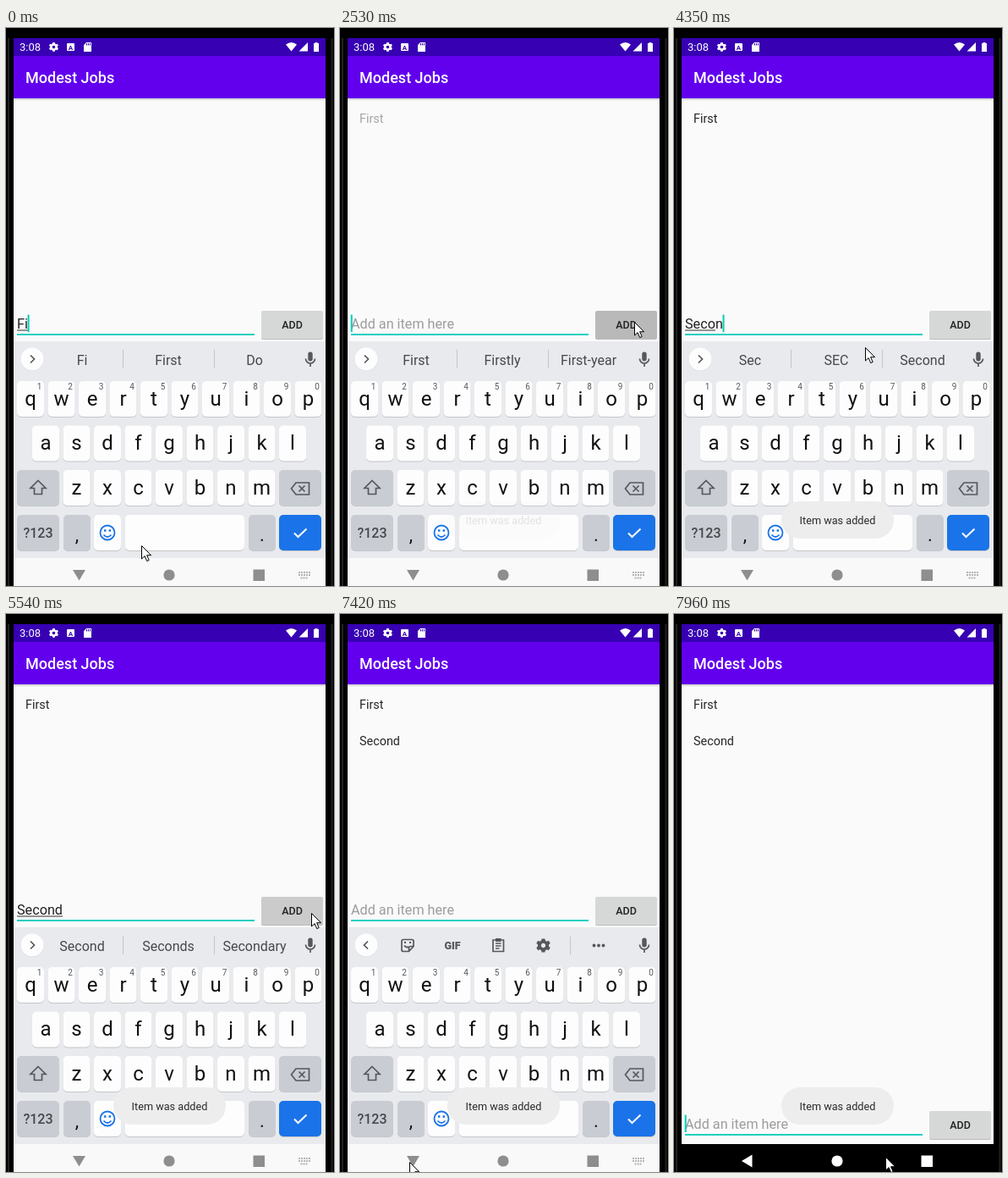
Write an HTML page that moves like this. It is 388 px wide and 659 px high and loops after 8000 ms.

```html
<!DOCTYPE html>
<html lang="en">
<head>
<meta charset="utf-8">
<title>Modest Jobs</title>
<style>
html, body { margin: 0; width: 100%; height: 100%; overflow: hidden; background: #000; }
svg { display: block; width: 388px; height: 659px; font-family: Roboto, sans-serif; }
text { white-space: pre; }
.mid { text-anchor: middle; }
.line { fill: none; stroke: #54585d; stroke-width: 1.7; }
</style>
</head>
<body>
<svg viewBox="0 0 388 659">
  <defs>
    <path id="gear" d="M-1.4-6h2.8l.4 1.7 1.3.7 1.6-.6 1.4 2.4-1.3 1.1v1.4l1.3 1.1-1.4 2.4-1.6-.6-1.3.7-.4 1.7h-2.8l-.4-1.7-1.3-.7-1.6.6-1.4-2.4 1.3-1.1v-1.4l-1.3-1.1 1.4-2.4 1.6.6 1.3-.7zM0-2a2 2 0 1 0 .01 0z" fill-rule="evenodd"/>
    <linearGradient id="shade" x2="0" y2="1"><stop stop-color="#000" stop-opacity=".22"/><stop offset="1" stop-color="#000" stop-opacity="0"/></linearGradient>
    <clipPath id="screen"><path d="M9 12h369v647H9z"/></clipPath>
  </defs>
  <path d="M0 0h388v659H0z"/>
  <path d="M3 12v647M385.5 12v647" stroke="#222" stroke-width="2"/>
  <g clip-path="url(#screen)">
    <path d="M9 83h369v576H9z" fill="#fafafa"/>
    <path d="M9 83h369v3H9z" fill="url(#shade)"/>
    <path d="M9 12h369v21H9z" fill="#3700b3"/>
    <path d="M9 33h369v50H9z" fill="#6200ee"/>
    <g fill="#fff">
      <text x="16" y="27" font-size="13">3:08</text>
      <text x="23" y="65" font-size="18" font-weight="500">Modest Jobs</text>
      <use href="#gear" x="56.5" y="22.5" transform="translate(5.6 2.2) scale(.9)"/>
      <rect x="72" y="18" width="9" height="9" rx="1"/>
      <text class="mid" x="76.5" y="25.5" font-size="8" font-weight="700" fill="#3700b3">A</text>
      <path d="M95 17h6v11h-9v-8zM331 19.5q6.500-5 13 0l-6.500 8zM346.500 27.500h10.500v-10.500zM365.500 17h3v1h1.500v10h-6v-10h1.500z"/>
      <path d="M95.500 18v2.500m2-2.500v2.500m2-2.500v2.500" stroke="#3700b3"/>
    </g>
    <g font-size="14.4" fill="#262626">
      <text id="item1" x="23" y="111.500">First</text>
      <text id="item2" x="23" y="154.500">Second</text>
    </g>
    <g id="row">
      <text id="hint" x="13" y="355" font-size="16.2" fill="#9c9c9c">Add an item here</text>
      <text id="entry" x="13" y="355" font-size="16.2" fill="#222"></text>
      <text id="mark" x="13" y="355" font-size="16.2" visibility="hidden"></text>
      <rect id="under" x="13" y="356.500" height="1" fill="#333"/>
      <path d="M13 361h281v2H13z" fill="#22cfc1"/>
      <rect id="caret" y="338.500" width="2" height="20.500" fill="#03cdb9"/>
      <rect x="302" y="335" width="73" height="33" rx="2" fill="#bbb"/>
      <rect id="button" x="302" y="334" width="73" height="33" rx="2"/>
      <text class="mid" x="338.500" y="355" font-size="12.500" font-weight="500" fill="#222">ADD</text>
    </g>
    <g id="board">
      <path d="M9 370h369v260H9z" fill="#e8eaed"/>
      <circle cx="31" cy="391.500" r="13.500" fill="#d5d7da"/>
      <circle cx="31" cy="391" r="13.500" fill="#fdfdfd"/>
      <path id="chevron" class="line" d="M-2-4.500L2.500 0-2 4.500"/>
      <g id="words" font-size="16" fill="#45484c">
        <path d="M138.500 380v22M246.500 380v22" stroke="#c3c6ca"/>
        <text class="mid" x="90" y="397.500"></text>
        <text class="mid" x="192" y="397.500"></text>
        <text class="mid" x="294" y="397.500"></text>
      </g>
      <g id="tools" fill="#54585d">
        <path class="line" d="M75 384.500h10q2 0 2 2v6l-5.500 6h-6.500q-2 0-2-2v-10q0-2 2-2zM87 392.500h-3.500q-2 0-2 2v4M76 391.500q2 3 5 1.500"/>
        <path d="M76 387h2v2h-2zm6 0h2v2h-2z"/>
        <text class="mid" x="133" y="395.500" font-size="12.500" font-weight="900">GIF</text>
        <path class="line" d="M181 385h12.500v13.500h-12.500zM184 389h6.500M184 392h6.500M184 395h4.500"/>
        <path d="M184 383h6.500v4h-6.500z"/>
        <use href="#gear" transform="translate(240.500 391.500) scale(1.350)"/>
        <path d="M272.500 381v21" stroke="#c3c6ca"/>
        <circle cx="300.500" cy="391.500" r="1.900"/><circle cx="306" cy="391.500" r="1.900"/><circle cx="311.500" cy="391.500" r="1.900"/>
      </g>
      <rect x="357.300" y="382.500" width="5.400" height="11" rx="2.700" fill="#54585d"/>
      <path class="line" d="M354.500 390.500a5.500 5.500 0 0 0 11 0M360 396v4"/>
      <g id="keys"></g>
      <path class="line" d="M38 534.500l9 9h-4.500v7h-9v-7H29z"/>
      <path class="line" d="M343 537h15.500v14H343l-5.500-7zM346.500 540.500l7 7m0-7l-7 7"/>
      <g fill="none" stroke="#1a73e8" stroke-width="1.800">
        <circle cx="120" cy="596" r="8.500"/>
        <path d="M115.500 598.500q4.500 5 9 0"/>
        <path d="M116 593.500h2.400m3.200 0h2.400" stroke-width="2.400"/>
      </g>
      <path d="M341 596.500l4.500 4.500 10-9.500" fill="none" stroke="#fff" stroke-width="2"/>
    </g>
    <path id="navBack" d="M9 626h369v33H9z"/>
    <g id="nav">
      <path id="back" d="M-7.500-6h15l-7.500 12.500z"/>
      <circle cx="193" cy="646" r="6.600"/>
      <path d="M292.500 639.500h13.500v13.500h-13.500z"/>
    </g>
    <path id="switcher" d="M346 643h14M346 646h14M348.500 649.500h9" stroke="#b4b4b4" stroke-width="2" stroke-dasharray="2 1"/>
    <g id="toast">
      <rect x="127" y="559" width="133" height="44" rx="22" fill="#ededee"/>
      <text class="mid" x="193.500" y="586" font-size="12.700" fill="#2c2c2c">Item was added</text>
    </g>
  </g>
  <path id="pointer" d="M.5.500v15.500l3.600-3.400 2.600 6 2.500-1.100-2.600-5.800h5z" fill="#fff" stroke="#000"/>
</svg>
<script>
const $ = id => document.getElementById(id);
const set = (id, attrs) => { for (const k in attrs) $(id).setAttribute(k, attrs[k]); };
const show = (id, on) => set(id, { opacity: +on });

// Keyboard
const key = (x, y, w, fill = '#fdfdfd') =>
  `<rect x="${x}" y="${y + 1}" width="${w}" height="42" rx="5" fill="#c4c7cb"/>
   <rect x="${x}" y="${y}" width="${w}" height="42" rx="5" fill="${fill}"/>`;
const label = (x, y, s, size, fill = '#111', weight = 400) =>
  `<text class="mid" x="${x}" y="${y}" font-size="${size}" fill="${fill}" font-weight="${weight}">${s}</text>`;
const grey = '#c9cdd3';
let keys = '';
[['qwertyuiop', 13, 417], ['asdfghjkl', 31, 469.5], ['zxcvbnm', 67.5, 522]].forEach(([letters, left, y], r) =>
  [...letters].forEach((c, i) => {
    const x = left + i * 36.5;
    keys += key(x, y, 32) + label(x + 16, y + 28.5, c, 24);
    if (!r) keys += label(x + 26.5, y + 10, (i + 1) % 10, 10, '#55595e');
  }));
keys += key(13, 522, 50, grey) + key(323, 522, 50, grey) + key(13, 575, 50, grey) +
  key(68, 575, 32, grey) + key(104, 575, 32) + key(141, 575, 141) +
  key(287, 575, 32, grey) + key(323, 575, 50, '#1a73e8') +
  label(38, 602, '?123', 16, '#45484c', 500) + label(84, 606, ',', 22) + label(303, 606, '.', 22);
$('keys').innerHTML = keys;

// State changes by time; each one adds to those before it.
const idle = '#d6d7d7', hover = '#cbcbcb', pressed = '#b9b9b9';
const type = (text, words, mark = text) => ({ text, words, mark, caret: 1, tools: 0 });
const clear = { text: '', mark: '', caret: 1 };
const steps = [
  [0, { ...type('Fi', 'Fi First Do'), button: idle, item1: 0, item2: 0, toast: 0, slide: 0, closed: 0 }],
  [250, type('Fir', 'Fir First Fire')],
  [500, type('Firs', 'Firs First Firsts')],
  [750, type('First', 'First Firstly First-year')],
  [1000, { caret: 0 }],
  [2400, { button: pressed }],
  [2530, { ...clear, item1: .4, toast: .12 }],
  [2680, { item1: 1, toast: 1, button: idle }],
  [2960, { tools: 1, caret: 0 }],
  [3500, type('S', 'S So She')],
  [3760, type('Se', 'Se See Send')],
  [4070, type('Sec', 'Se See Send')],
  [4210, type('Seco', 'Sec SEC Second')],
  [4350, type('Secon', 'Sec SEC Second', 'Seco')],
  [4500, type('Second', 'Secon Second Seconds')],
  [4630, { words: 'Second Seconds Secondly' }],
  [5040, { words: 'Second Seconds Secondary', caret: 0 }],
  [5540, { button: hover }],
  [5800, { button: pressed }],
  [5930, { ...clear, item2: .4, toast: .4 }],
  [6070, { item2: 1, toast: 1 }],
  [6190, { button: idle }],
  [6320, { tools: 1 }],
  [6460, { caret: 0 }],
  [7000, { caret: 1 }],
  [7290, { caret: 0 }],
  [7690, { slide: 90 }],
  [7820, { closed: 1 }],
  [7960, { caret: 1 }]
];

// Pointer moves: start, number of hops, end point
const moves = [
  [1500, 1, 151, 611], [1750, 5, 348, 347], [2680, 3, 226, 377],
  [5040, 5, 361, 353], [6460, 6, 82, 647], [7820, 2, 250, 641]
];
const hop = 125;

function pointerAt(t) {
  let x = 160, y = 611;
  for (const [start, n, toX, toY] of moves) {
    if (t < start) break;
    const p = Math.min(1, (Math.floor((t - start) / hop) + 1) / n);
    const e = p * p * (3 - 2 * p);
    x += (toX - x) * e;
    y += (toY - y) * e;
  }
  return [x, y];
}

function draw(t) {
  const s = Object.assign({}, ...steps.filter(([at]) => at <= t).map(([, change]) => change));
  $('entry').textContent = s.text;
  $('mark').textContent = s.mark;
  const width = id => $(id).textContent ? $(id).getComputedTextLength() : 0;
  set('under', { width: width('mark') });
  set('caret', { x: 13 + width('entry') - .3 });
  show('caret', s.caret);
  show('hint', !s.text);
  set('button', { fill: s.button });
  show('item1', s.item1);
  show('item2', s.item2);
  show('toast', s.toast);

  const words = s.words.split(' ');
  $('words').querySelectorAll('text').forEach((el, i) => el.textContent = words[i]);
  show('words', !s.tools);
  show('tools', s.tools);
  set('chevron', { transform: `translate(31 391) scale(${s.tools ? -1 : 1} 1)` });

  set('row', { transform: `translate(0 ${s.slide ? 253 : 0})` });
  set('board', { transform: `translate(0 ${s.slide})` });
  show('board', !s.closed);
  show('switcher', !s.closed);
  set('navBack', { fill: s.closed ? '#000' : '#f9f9f9' });
  set('nav', { fill: s.closed ? '#fff' : '#8e8e8e' });
  set('back', { transform: `translate(86.5 646) rotate(${s.closed ? 90 : 0})` });
  set('pointer', { transform: `translate(${pointerAt(t)})` });
}

const begin = performance.now();
function tick() {
  draw((performance.now() - begin) % 8000);
  requestAnimationFrame(tick);
}
tick();
</script>
</body>
</html>
```
